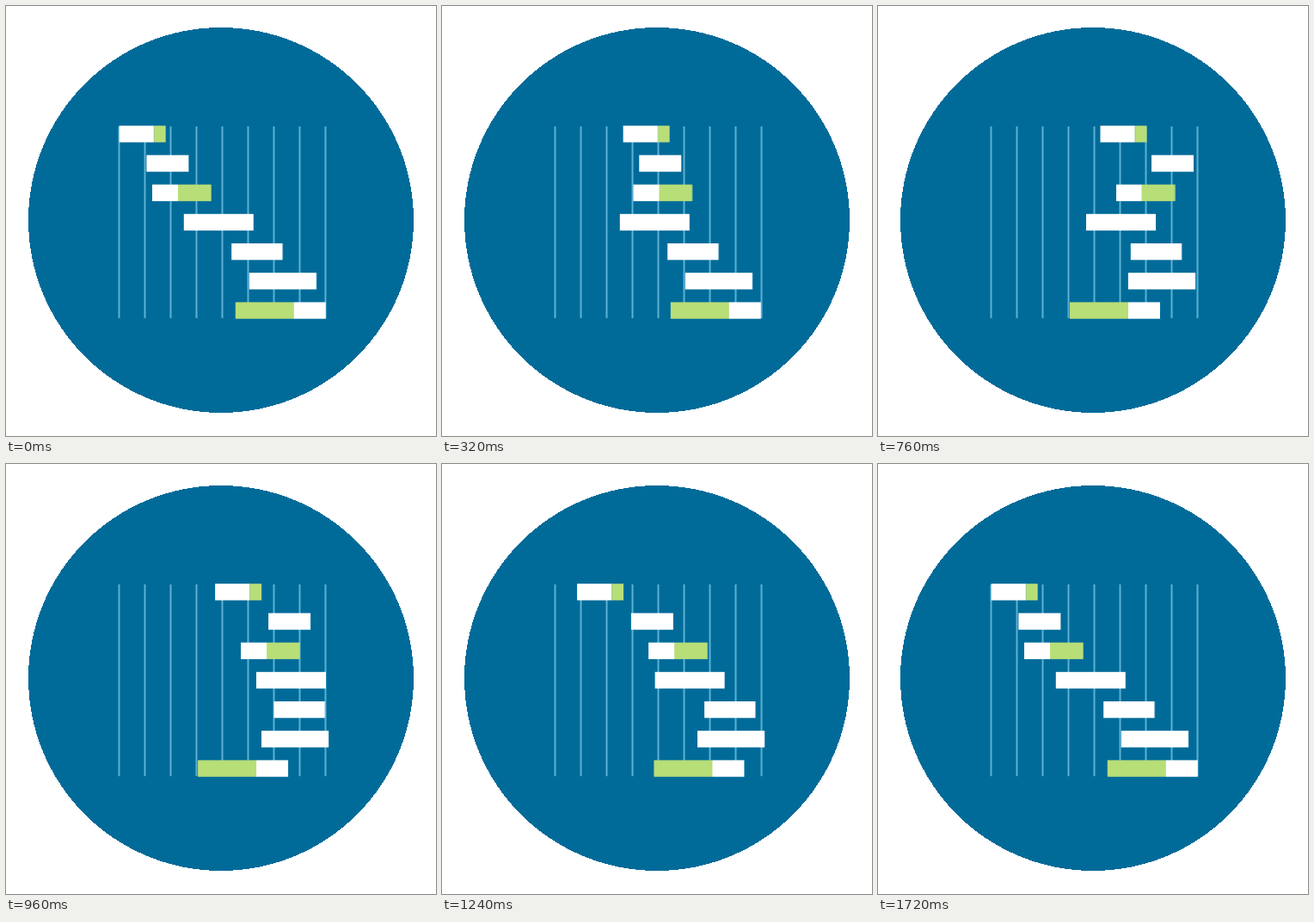
Recreate the animation shown at these times as an HTML page. Size 500 px wide and 500 px high, loop 2 s.

```html
<!DOCTYPE html>
<html lang="en">
<head>
<meta charset="utf-8">
<title>Gantt chart</title>
<style>
  html, body { margin: 0; width: 100%; height: 100%; overflow: hidden; background: #fff; }
  svg { display: block; width: 100vw; height: 100vh; }
</style>
</head>
<body>
<svg id="chart" viewBox="0 0 500 500">
  <circle cx="250" cy="249" r="224" fill="#006b99" shape-rendering="crispEdges"/>
</svg>
<script>
const LOOP = 2000, STEP = 40;
const WHITE = '#fff', GREEN = '#b8de78', LINE = '#5db1d3';
const SOFT = 'cubic-bezier(.333, 0, .833, 1)';
const HEAVY = 'cubic-bezier(.5, 0, .833, 1)';

// parts: [width, colour]; out and back: [start ms, end ms]
const bars = [
  { from: 131.7, to: 258.5, parts: [[40.3, WHITE], [13.7, GREEN]], out: [0, 490], back: [795, 1341], ease: HEAVY },
  { from: 163.4, to: 317.5, parts: [[49, WHITE]], out: [32, 600], back: [850, 1440] },
  { from: 170, to: 276.5, parts: [[30, WHITE], [38.7, GREEN]], out: [0, 575], back: [838, 1623], ease: HEAVY },
  { from: 206.8, to: 291, parts: [[81, WHITE]], out: [560, 960], back: [1025, 1400] },
  { from: 262.2, to: 311.5, parts: [[59.4, WHITE]], out: [480, 900], back: [1135, 1563] },
  { from: 282.8, to: 297, parts: [[78.2, WHITE]], out: [490, 930], back: [1260, 1690] },
  { from: 266.8, to: 223, parts: [[68, GREEN], [37, WHITE]], out: [283, 680], back: [947, 1445] }
];

const chart = document.getElementById('chart');

function add(parent, tag, attrs = {}) {
  const node = document.createElementNS('http://www.w3.org/2000/svg', tag);
  for (const key in attrs) node.setAttribute(key, attrs[key]);
  return parent.appendChild(node);
}

for (let i = 0; i < 9; i++) {
  add(chart, 'rect', { x: 130.5 + 30 * i, y: 140, width: 2, height: 223, fill: LINE });
}

const motions = bars.map(({ from, to, parts, out, back, ease = SOFT }, row) => {
  const group = add(chart, 'g');
  let x = 0;
  for (const [width, fill] of parts) {
    add(group, 'rect', { x, y: 139.2 + 34.2 * row, width, height: 19.3, fill });
    x += width;
  }
  const key = (time, pos, easing = 'linear') =>
    ({ offset: time / LOOP, transform: `translateX(${pos}px)`, easing });
  const motion = group.animate([
    key(0, from),
    key(out[0], from, SOFT), key(out[1], to),
    key(back[0], to, ease), key(back[1], from),
    key(LOOP, from)
  ], { duration: LOOP, fill: 'both' });
  motion.pause();
  return motion;
});

const start = performance.now();
function draw() {
  const time = (performance.now() - start) % LOOP;
  const stepped = Math.floor(time / STEP) * STEP;
  for (const motion of motions) motion.currentTime = stepped;
  requestAnimationFrame(draw);
}
draw();
</script>
</body>
</html>
```
